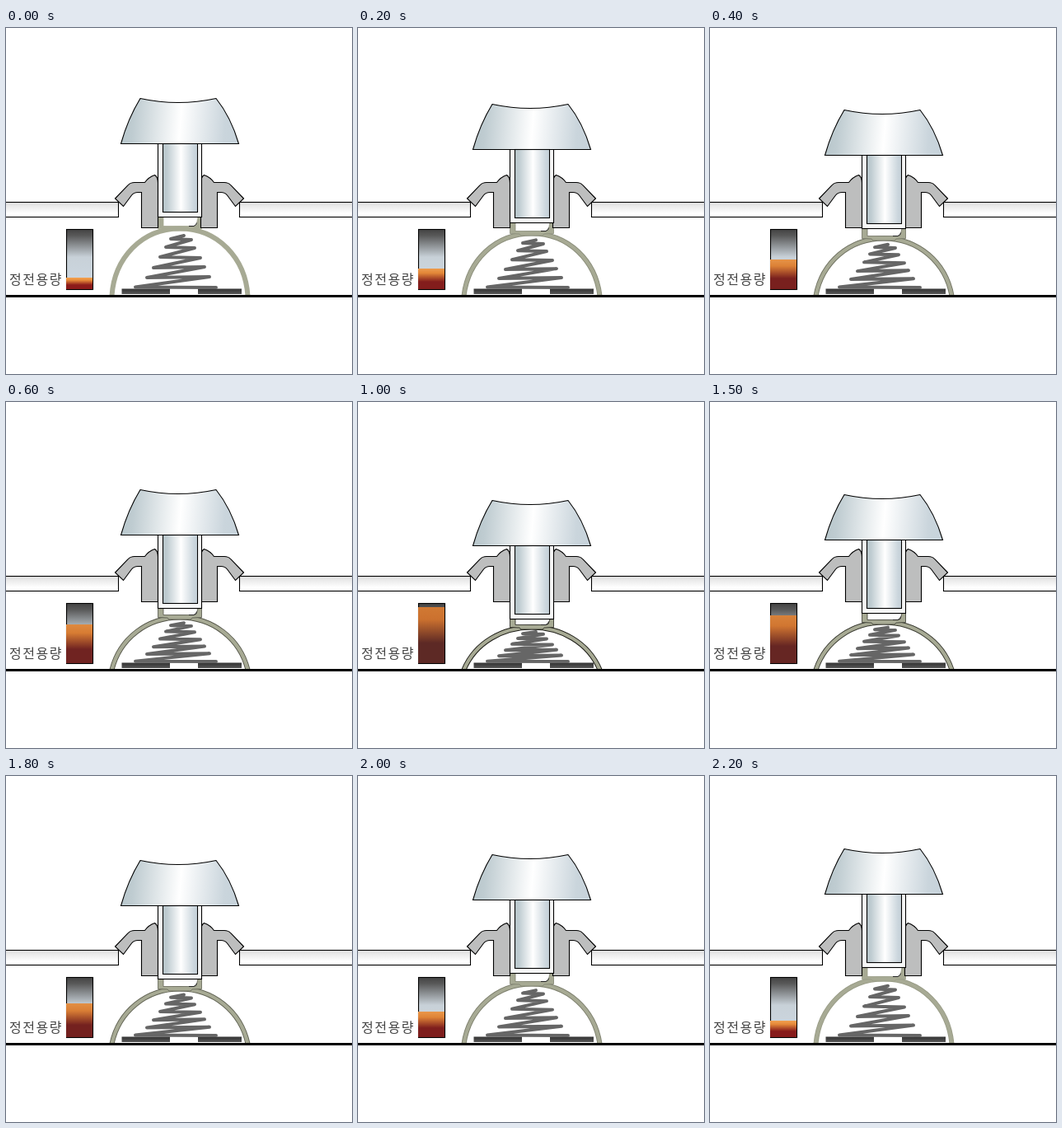
These frames come from a looping animation (420x420 px, 2300 ms). An HTML page:

```html
<!DOCTYPE html>
<html lang="ko">
<head>
<meta charset="utf-8">
<style>
html, body { margin: 0; width: 100%; height: 100%; overflow: hidden; background: #fff; }
svg { display: block; width: 420px; height: 420px; }
text {
  font: 300 16px "Noto Sans CJK KR Light", "Noto Sans CJK KR", "Noto Sans CJK JP", sans-serif;
  letter-spacing: 1.5px;
  fill: #444;
}
.line { stroke: #000; stroke-width: 1.1; }
</style>
</head>
<body>
<svg viewBox="0 0 420 420">
  <defs>
    <linearGradient id="steel" x2="1">
      <stop stop-color="#b6c5ca"/><stop offset=".12" stop-color="#bfccd1"/>
      <stop offset=".52" stop-color="#fff"/><stop offset=".9" stop-color="#cad5dc"/>
      <stop offset="1" stop-color="#c7d3db"/>
    </linearGradient>
    <linearGradient id="cap" href="#steel" y2=".03"/>
    <linearGradient id="plate" x2="0" y2="1">
      <stop stop-color="#dedede"/><stop offset=".75" stop-color="#fff"/>
    </linearGradient>
    <linearGradient id="gauge" x2="0" y2="1">
      <stop stop-color="#444"/><stop offset=".1" stop-color="#585858"/>
      <stop offset=".46" stop-color="#c8d1d8"/><stop offset="1" stop-color="#cdd8e2"/>
    </linearGradient>
    <linearGradient id="heat" x2="0" y2="1">
      <stop/><stop offset=".22"/><stop offset=".64"/><stop offset="1"/>
    </linearGradient>
    <linearGradient id="contact" x2="0" y2="1">
      <stop stop-color="#333"/><stop offset="1" stop-color="#555"/>
    </linearGradient>
    <path id="hook" d="M132.500 207L148 191Q151 187.500 156 187.500H168.500Q173 181 180.500 178.500Q184.500 181 184.500 188V242.500H164.500V199.500H160Q155.500 199.500 152.500 203L142.500 216.500Z"/>
  </defs>

  <g fill="url(#plate)" class="line">
    <rect x="-2" y="211.500" width="138.500" height="18"/>
    <rect x="283.500" y="211.500" width="139" height="18"/>
  </g>

  <g fill="url(#contact)">
    <rect x="140.500" y="316.500" width="58.500" height="6.500"/>
    <rect x="233" y="316.500" width="53" height="6.500"/>
  </g>
  <path id="spring" fill="none" stroke="#666" stroke-width="4" stroke-linejoin="round" stroke-linecap="round"/>
  <path id="rim" fill="none" stroke-width="6"/>
  <path id="dome" fill="none" stroke="#a7aa94" stroke-width="4.200"/>
  <path id="seat" fill="#a7aa94" stroke-width=".8"/>
  <path id="notch" fill="none" stroke="#222" stroke-width="1"/>

  <g fill="#bdbebe" class="line">
    <use href="#hook"/>
    <use href="#hook" transform="matrix(-1 0 0 1 421 0)"/>
  </g>

  <g id="key" class="line">
    <rect x="184.500" y="138" width="53" height="91.500" fill="#f7f8f8"/>
    <path fill="url(#cap)" d="M163 85.500Q209 95.500 255 85.500Q273 108 282.500 140.500H139.500Q148 110 163 85.500Z"/>
    <rect x="190.500" y="140.500" width="42" height="83" fill="url(#steel)"/>
  </g>

  <rect x="73.500" y="244.500" width="32" height="73" fill="url(#gauge)" class="line"/>
  <rect id="fill" x="73" width="32" fill="url(#heat)"/>
  <text x="4" y="311">정전용량</text>
  <rect y="324" width="420" height="3"/>
</svg>
<script>
const STEP = 100, STEPS = 23, DEPTH = 11;
const el = id => document.getElementById(id);
const set = (id, attrs) => {
  for (const name in attrs) el(id).setAttribute(name, attrs[name]);
};
const mix = (a, b, u) => `rgb(${a.map((v, i) => Math.round(v + (b[i] - v) * u))})`;

const coil = [[216, 252], [200, 256], [225, 257], [194, 266], [229, 267], [187, 278],
  [236, 279], [179, 291], [241, 290], [171, 303], [247, 302], [157, 314.5], [255, 315]];
const stops = el('heat').children;
const orange = [[244, 164, 84], [205, 117, 48]];
const amber = [[232, 140, 58], [200, 110, 46]];
const red = [[140, 26, 26], [88, 42, 38]];

function draw(k) {
  const u = k / DEPTH;
  const drop = Math.round(3.42 * k);
  set('key', { transform: `translate(0 ${drop})` });

  const level = Math.max(245, Math.round(302.5 - 5.4 * k));
  set('fill', { y: level, height: 317 - level });
  [orange, amber, red, red].forEach((c, i) => stops[i].setAttribute('stop-color', mix(...c, u)));

  const squash = (63 - 2.7 * k) / 63;
  set('spring', {
    d: 'M' + coil.map(([x, y]) => `${x} ${315 - (315 - y) * squash}`).join('L')
  });

  // The dome flattens from a half circle towards a shallow arc.
  const top = 243.5 + 3 * k;
  const foot = 131.5 + 12 * u;
  const crown = 164 + 13 * u;
  const side = 280 + 13 * u;
  const arc = `M128.500 325C${foot} ${side} ${crown} ${top} 211 ${top}S${422 - foot} ${side} 293.500 325`;
  const edge = mix([167, 170, 148], [15, 15, 10], u);
  set('rim', { d: arc, stroke: edge });
  set('dome', { d: arc });

  const post = 229.5 + drop;
  const floor = Math.round(top - 4) + 0.5;
  set('seat', {
    stroke: edge,
    d: `M184.500 ${post}H191V${floor}H228L231 ${floor - 1}L233 ${post}H237.500V${floor + 3}`
      + `L226 ${floor + 3.5}L224 ${floor + 5.5}H198L196 ${floor + 3.5}L184.500 ${floor + 3}Z`
  });
  set('notch', { d: `M222 ${floor}H228Q231 ${floor - 1} 231.500 ${floor - 4}` });
}

let last = -1;
function tick() {
  const i = Math.floor(performance.now() / STEP) % STEPS;
  if (i !== last) draw(i <= DEPTH ? i : STEPS - i);
  last = i;
  requestAnimationFrame(tick);
}
tick();
</script>
</body>
</html>
```
